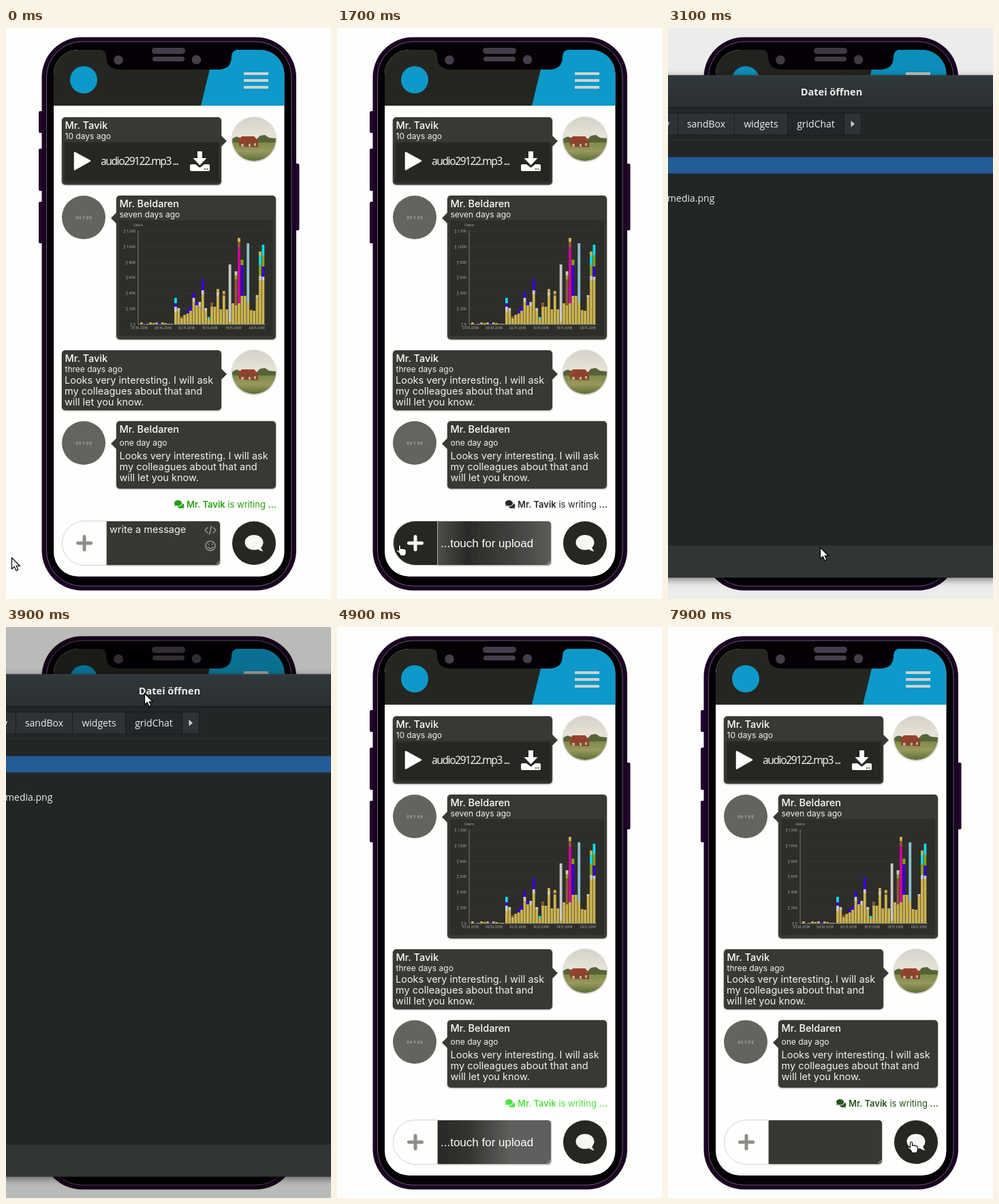
Recreate the animation shown at these times as an HTML page. Size 477x838 px, loop 8 s.

```html
<!DOCTYPE html>
<html lang="en">
<head>
<meta charset="utf-8">
<title>Chat with upload</title>
<style>
html, body { margin: 0; width: 100%; height: 100%; overflow: hidden; background: #fefefd; }
svg { display: block; width: 477px; height: 838px; }
text { font-family: Inter, sans-serif; font-size: 14.5px; fill: #f1f1ee; white-space: pre; }
.name { font-weight: 500; fill: #fff; }
.date { font-size: 12px; }
.tiny { font-size: 5px; fill: #b5b5b0; }
.gtk, .gtk text { font-family: "Open Sans", sans-serif; font-size: 14px; fill: #eeeeec; }
</style>
</head>
<body>
<svg id="stage" viewBox="0 0 477 838" xmlns="http://www.w3.org/2000/svg">
  <defs>
    <clipPath id="screen"><rect x="70" y="32" width="338.500" height="773" rx="36"/></clipPath>
    <clipPath id="round"><circle r="32"/></clipPath>
    <clipPath id="panel"><rect x="166" y="282" width="213.500" height="170"/></clipPath>
    <filter id="soft" x="-10%" y="-15%" width="120%" height="130%">
      <feDropShadow dx="0" dy="0.500" stdDeviation="1.200" flood-color="#000" flood-opacity=".55"/>
    </filter>
    <filter id="lift" x="-10%" y="-10%" width="120%" height="120%">
      <feDropShadow dx="0" dy="3" stdDeviation="6" flood-color="#000" flood-opacity=".5"/>
    </filter>
    <linearGradient id="sky" x1="0" y1="0" x2="0" y2="1">
      <stop offset="0" stop-color="#d5d0c8"/><stop offset=".38" stop-color="#e6e1d6"/>
    </linearGradient>
    <linearGradient id="grass" x1="0" y1="0" x2="0" y2="1">
      <stop offset="0" stop-color="#7d8a45"/><stop offset=".45" stop-color="#98995f"/><stop offset="1" stop-color="#5b6a31"/>
    </linearGradient>
    <linearGradient id="bar" x1="0" y1="0" x2="0" y2="1">
      <stop offset="0" stop-color="#30373a"/><stop offset="1" stop-color="#2a2f31"/>
    </linearGradient>
    <linearGradient id="wave" gradientUnits="userSpaceOnUse" x1="148" x2="314" y1="0" y2="0">
      <stop offset="0"/><stop offset=".253"/><stop offset=".645"/><stop offset="1"/>
    </linearGradient>
    <g id="farm" clip-path="url(#round)">
      <rect x="-32" y="-32" width="64" height="64" fill="url(#sky)"/>
      <path d="M-32 0Q-26-6-21-2L-14-1 4 0 9-5 16-6 22-2 32-1V8H-32Z" fill="#56633a"/>
      <rect x="-32" y="5" width="64" height="28" fill="url(#grass)"/>
      <path d="M-23 4-17-4H0L6 3V12L-21 11Z" fill="#85452f"/>
      <path d="M-25 5-18-4H0L7 4-5 3-10-1-15 5Z" fill="#96412c"/>
      <path d="M-19 7h4v4h-4zM-8 7h3v4h-3zM0 6h3v4h-3z" fill="#c3ad92"/>
    </g>
    <g id="blank">
      <circle r="32" fill="#64645f"/>
      <text class="tiny" style="font-size:6.500px" text-anchor="middle" transform="scale(1 -1)" y="2.500">64 x 64</text>
    </g>
  </defs>

  <rect width="477" height="838" fill="#fefefd"/>
  <g id="phone"></g>
  <g id="chat"></g>
  <g id="writing">
    <path d="M252.500 693c3.200 0 5.500 1.800 5.500 4.200s-2.300 4.200-5.500 4.200c-1 0-1.900-.2-2.700-.5-.8.5-1.700.8-2.800.8.6-.6 1-1.200 1.100-1.900-.7-.7-1.100-1.600-1.100-2.600 0-2.400 2.300-4.200 5.500-4.200Z"/>
    <path d="M259 697.500c1.500.7 2.500 2 2.500 3.500 0 .9-.4 1.800-1.100 2.500.1.800.6 1.400 1.100 2-1.100 0-2-.4-2.800-.9-3 .8-5.900-.2-7-2.200 4.200 0 7.200-2 7.300-4.900Z"/>
    <text x="397" y="704" text-anchor="end" style="font-size:13px;fill:inherit"><tspan font-weight="600">Mr. Tavik</tspan> is writing <tspan font-weight="600">...</tspan></text>
  </g>
  <g id="form">
    <path id="add" d="M147.500 723.500V788.500H115a32.500 32.500 0 0 1 0-65Z" stroke="#d3d3ce"/>
    <path id="plus" d="M115 746.500V765.500M105.500 756H124.500" stroke-width="5" stroke-linecap="round"/>
    <path id="field-box" d="M148 724H309q5 0 5 5V783q0 5-5 5H148Z" filter="url(#soft)"/>
    <path d="M308 787.500l6-6M311 787.500l3-3" stroke="#bbb"/>
    <g id="idle">
      <text x="152" y="741">write a message</text>
      <g fill="none" stroke="#8e8e89" stroke-width="1.700" stroke-linecap="round" stroke-linejoin="round">
        <path d="M296 733l-4 4 4 4M304 733l4 4-4 4M301.500 731l-3 12"/>
        <circle cx="300" cy="760" r="7"/>
        <path d="M296.500 762q3.500 4 7 0M297.500 757.500v.5M302.500 757.500v.5"/>
      </g>
    </g>
    <text id="hint" x="152" y="762" style="font:17px 'Liberation Sans',Arial,sans-serif;fill:#fff">...touch for upload</text>
    <circle cx="364" cy="756" r="32" fill="#272722"/>
    <path d="M364 744c-7.700 0-13.500 4.900-13.500 11s5.800 11 13.500 11c2.200 0 4.200-.4 6-1.100 1.900 1.700 4.600 2.900 7.500 2.900-1.700-1.700-2.900-3.600-3.200-5.400 2-1.900 3.200-4.500 3.200-7.400 0-6.100-5.800-11-13.500-11Z" fill="#f6f6f4"/>
  </g>
  <rect id="dim" width="477" height="838" fill="#000"/>
  <g id="dialog" class="gtk"></g>
  <path id="arrow" d="M.5.5V17L4.300 13.500 7 19.500 9.800 18.200 7.200 12.500H12.300Z" fill="#fff" stroke="#000" stroke-width="1.200"/>
  <path id="hand" d="M3 .7q1.500 0 1.500 1.500V6l1.200-.6 1.300.8 1.300-.5 1.300 1 1.400-.2q1.500.8 1.500 2.500V13l-1.500 3.800H4.200L2.500 13-1.800 9.600q-.6-1.600.8-2L1.500 9V2.200Q1.500.7 3 .7Z" fill="#fff" stroke="#000" stroke-width="1.100"/>
</svg>

<script>
const LOOP = 8000, STEP = 100;
const el = id => document.getElementById(id);
const rect = (x, y, w, h, fill, rx = 0, more = "") =>
  `<rect x="${x}" y="${y}" width="${w}" height="${h}" rx="${rx}" fill="${fill}" ${more}/>`;
const text = (x, y, str, cls = "", more = "") => `<text x="${x}" y="${y}" class="${cls}" ${more}>${str}</text>`;
const use = (id, x, y) => `<use href="#${id}" x="${x}" y="${y}"/>`;
const dot = (x, y, r, fill) => `<circle cx="${x}" cy="${y}" r="${r}" fill="${fill}"/>`;

function phone() {
  const side = [[48, 122, 32], [48, 177, 62], [48, 255, 61], [424, 199, 98]]
    .map(([x, y, h]) => rect(x, y, 6.5, h, "#25052e", 2)).join("");
  const menu = [65, 75, 85].map(y => rect(349, y, 36, 4, "#cfd3d0")).join("");
  return side + rect(52.5, 13.5, 373.5, 812, "#1b0322", 59)
    + rect(59.5, 20, 359.5, 799, "#040006", 52, 'stroke="#655a70"')
    + rect(70, 32, 338.5, 773, "#fefefd", 36)
    + `<g clip-path="url(#screen)">${rect(70, 32, 339, 82, "#252620")}
       <path d="M306 32H409V114H286Z" fill="#0d99c9"/></g>`
    + '<path d="M138 31Q147 33 147 42 147 61 168 61H311Q331 61 331 42 331 33 341 31Z" fill="#040006"/>'
    + rect(214, 29, 49, 9, "#453d49", 4.5) + rect(215, 42, 47, 7, "#453d49", 3.5)
    + dot(165, 47, 6.8, "#453d49") + dot(279.5, 46.5, 6.8, "#453d49")
    + dot(114, 76, 20, "#0d99c9") + menu;
}

// Each bar: yellow height, then colour letter and height for stacked parts.
const BARS = "18 w8 b5 c8,20 w4,9 k3,14,16 b5,20 b6,33 w6 b8,28 b5,27 w6,44 w6 b17,20 w4,8 c3,26 k6,26,42 w5 y5,22," +
  "42 k3 y4,22,4 w84,31,28 k38 g6 w6,31 m82 k8 y6,42 b45 g8,42,33 l86,21,20,40 w3,65 w6 g16 c14 y6,65 w5 b15 g16 c16";
const HUES = { w: "#c9c9c5", b: "#3b00d6", c: "#10d9e8", k: "#8b5a35", g: "#83a51d",
  m: "#d3009b", l: "#8fc3cf", y: "#cbb350" };

function chart() {
  let out = rect(166, 282, 226, 170, "#2d2e2a") + text(187, 291, "Users", "tiny");
  ["1.200", "1.000", "800", "600", "400", "200", "0"].forEach((v, i) => {
    const y = 298 + i * 22.8;
    out += rect(194, y, 186, .6, "#3a3b36") + text(190, y + 2, "∑ " + v, "tiny", 'text-anchor="end"');
  });
  let seed = 7;
  for (let i = 0; i < 11; i++) {
    seed = seed * 75 % 257;
    const h = 1 + seed % 3;
    out += rect(197 + i * 4.43, 435 - h, 3.6, h, i % 5 == 1 ? HUES.b : HUES.y);
  }
  BARS.split(",").forEach((bar, i) => {
    let y = 435;
    bar.split(" ").forEach((part, n) => {
      const h = +(n ? part.slice(1) : part);
      y -= h;
      out += rect(247 + i * 4.43, y, 3.8, h, n ? HUES[part[0]] : HUES.y);
    });
  });
  out += '<path d="M194 297V435H381" fill="none" stroke="#8c8c87" stroke-width=".8"/><g clip-path="url(#panel)">';
  ["01.10.2018", "09.10.2018", "02.11.2018", "10.11.2018", "19.11.2018", "26.11.2018"].forEach((d, i) =>
    out += text(196 + i * 34.5, 442, d, "tiny", 'text-anchor="middle"'));
  return out + "</g>";
}

function bubble(x, y, h, tail, name, date, gap = 15) {
  const right = x < 100, edge = right ? 316 : 162, tip = right ? 324 : 154;
  return rect(x, y, 234, h, "#383934", 5, 'filter="url(#soft)"')
    + `<path d="M${edge} ${tail - 8}L${tip} ${tail}L${edge} ${tail + 8}Z" fill="#383934"/>`
    + text(x + 4.5, y + 17, name, "name") + text(x + 4.5, y + 17 + gap, date, "date");
}

function chat() {
  const me = "Mr. Tavik", you = "Mr. Beldaren";
  const reply = (x, y) => ["Looks very interesting. I will ask", "my colleagues about that and", "will let you know."]
    .map((s, i) => text(x, y + 16 * i, s)).join("");
  const ring = [163, 505].map(y => `<circle cx="364" cy="${y}" r="32" fill="#ddd" filter="url(#soft)"/>` + use("farm", 364, y));
  return bubble(82, 131, 99, 166, me, "10 days ago")
    + rect(85, 167, 229, 60, "#2e2f2a") + rect(87, 169, 225, 56, "#262722")
    + '<path d="M101 183V207.500L123 195Z" fill="#fff" stroke="#fff" stroke-width="2.500" stroke-linejoin="round"/>'
    + text(139, 201, "audio29122.mp3 ...", "", `style="font:15.5px 'Noto Sans',sans-serif;letter-spacing:-1.4px"`)
    + `<path d="M281 181h7v10h6.500L284.500 201.500 274.500 191H281Z" fill="#fff"/>
       <path d="M272 200h6l6.500 5 6.500-5h6q2 0 2 2v6q0 2-2 2H272q-2 0-2-2v-6q0-2 2-2Z" fill="#fff"/>
       <path d="M291 207h2M294.500 207h2" stroke="#262722" stroke-width="1.600"/>`
    + bubble(162, 246, 211, 279, you, "seven days ago") + chart()
    + bubble(82, 473, 88, 508, me, "three days ago") + reply(86, 522)
    + bubble(162, 577, 99, 610, you, "one day ago", 19) + reply(166.5, 633)
    + ring.join("") + use("blank", 114, 278) + use("blank", 114, 609);
}

function dialog() {
  const tab = (x, w, label, on) => rect(x + .5, 124.5, w, 32, on ? "#22272a" : "#2c3235", 0, 'stroke="#1a1d1f"')
    + text(x + w / 2 + .5, 145, label, "", 'text-anchor="middle"');
  return rect(-40, 69, 557, 737, "#222628", 0, 'filter="url(#lift)"')
    + rect(-40, 69, 557, 47, "url(#bar)") + rect(-40, 69, 557, 1, "#3b4346") + rect(-40, 116, 557, 1, "#121516")
    + text(240, 98, "Datei öffnen", "", 'text-anchor="middle" style="font-size:14.5px;font-weight:700"')
    + tab(-20, 34, "") + text(-5, 145, "y")
    + tab(14, 83, "sandBox") + tab(97, 78, "widgets") + tab(175, 83, "gridChat", true) + tab(258, 25, "")
    + '<path d="M268.500 135.500V145L274 140.200Z" fill="#c9cccb"/>'
    + rect(-40, 163, 557, 1, "#303537") + rect(-40, 189, 557, 24, "#235c96")
    + text(-1, 254, "media.png") + rect(-40, 758, 557, 48, "#303636") + rect(-40, 758, 557, 1, "#1a1d1e");
}

// Keys are rows of [time, value, value, ...], blended linearly.
function track(keys, t) {
  if (t <= keys[0][0]) return keys[0].slice(1);
  for (let i = 1; i < keys.length; i++) {
    const a = keys[i - 1], b = keys[i];
    if (t <= b[0]) {
      const k = (t - a[0]) / (b[0] - a[0]);
      return a.slice(1).map((v, n) => v + (b[n + 1] - v) * k);
    }
  }
  return keys[keys.length - 1].slice(1);
}

const POINTER = [[0, 8, 777], [300, 200, 798], [500, 452, 807], [700, 300, 790], [900, 112, 765], [1000, 89, 758],
  [2800, 89, 758], [3000, 180, 765], [3100, 223, 762], [3500, 293, 113], [3700, 293, 113], [4300, 24, 64],
  [5500, 236, 814], [6300, 327, 786], [6400, 332, 785], [6800, 428, 785], [7100, 354, 755], [LOOP, 354, 755]];
const SHADE = [[3000, 0], [3100, .07], [3400, .27], [4700, .27], [4800, .1], [4900, 0]];
const STRETCH = [[3000, .75], [3100, 1], [4600, 1], [4700, .529]];
const WAVE = [[1000, 88, 50, 52, 84], [1700, 78, 42, 64, 92], [4700, 42, 48, 94, 98], [6300, 44, 58, 101, 74], [7300, 46, 64, 96, 66]];
const GLOW = [[0, 38, 38, 38], [.53, 40, 156, 18], [1, 82, 236, 68]];

const show = (id, on) => el(id).setAttribute("display", on ? "inline" : "none");
const paint = (id, fill) => el(id).setAttribute("fill", fill);

function draw(t) {
  const hover = t >= 1000 && t < 2800;
  const hint = t >= 1000 && t < 7200;
  const open = t >= 3000 && t < 4800;

  const glow = (1 - Math.cos(2 * Math.PI * (t - 1850) / 7100)) / 2;
  paint("writing", `rgb(${track(GLOW, glow).map(Math.round)})`);

  paint("add", hover ? "#272722" : "#fefefd");
  el("plus").setAttribute("stroke", hover ? "#f4f4f2" : "#8d8d8a");
  show("idle", t < 1000);
  show("hint", hint);
  paint("field-box", t >= 1000 && t < 7400 ? "url(#wave)" : "#383832");
  const levels = track(WAVE, t);
  el("wave").querySelectorAll("stop").forEach((stop, i) => {
    const v = Math.round(levels[i]);
    stop.setAttribute("stop-color", `rgb(${v},${v},${v - 2})`);
  });

  el("dim").setAttribute("opacity", track(SHADE, t)[0]);
  show("dialog", open);
  el("dialog").setAttribute("transform", `translate(0 438) scale(1 ${track(STRETCH, t)[0]}) translate(0 -437.5)`);

  const [x, y] = track(POINTER, t);
  const hand = hover || t >= 7000;
  const seen = t < 4700 || t >= 5500;
  for (const id of ["arrow", "hand"]) {
    show(id, seen && hand === (id === "hand"));
    el(id).setAttribute("transform", `translate(${Math.round(x)} ${Math.round(y)})`);
  }
}

el("phone").innerHTML = phone();
el("chat").innerHTML = chat();
el("dialog").innerHTML = dialog();

const start = performance.now();
function tick() {
  const t = (performance.now() - start) % LOOP;
  draw(Math.floor(t / STEP) * STEP);
  requestAnimationFrame(tick);
}
tick();
</script>
</body>
</html>
```
